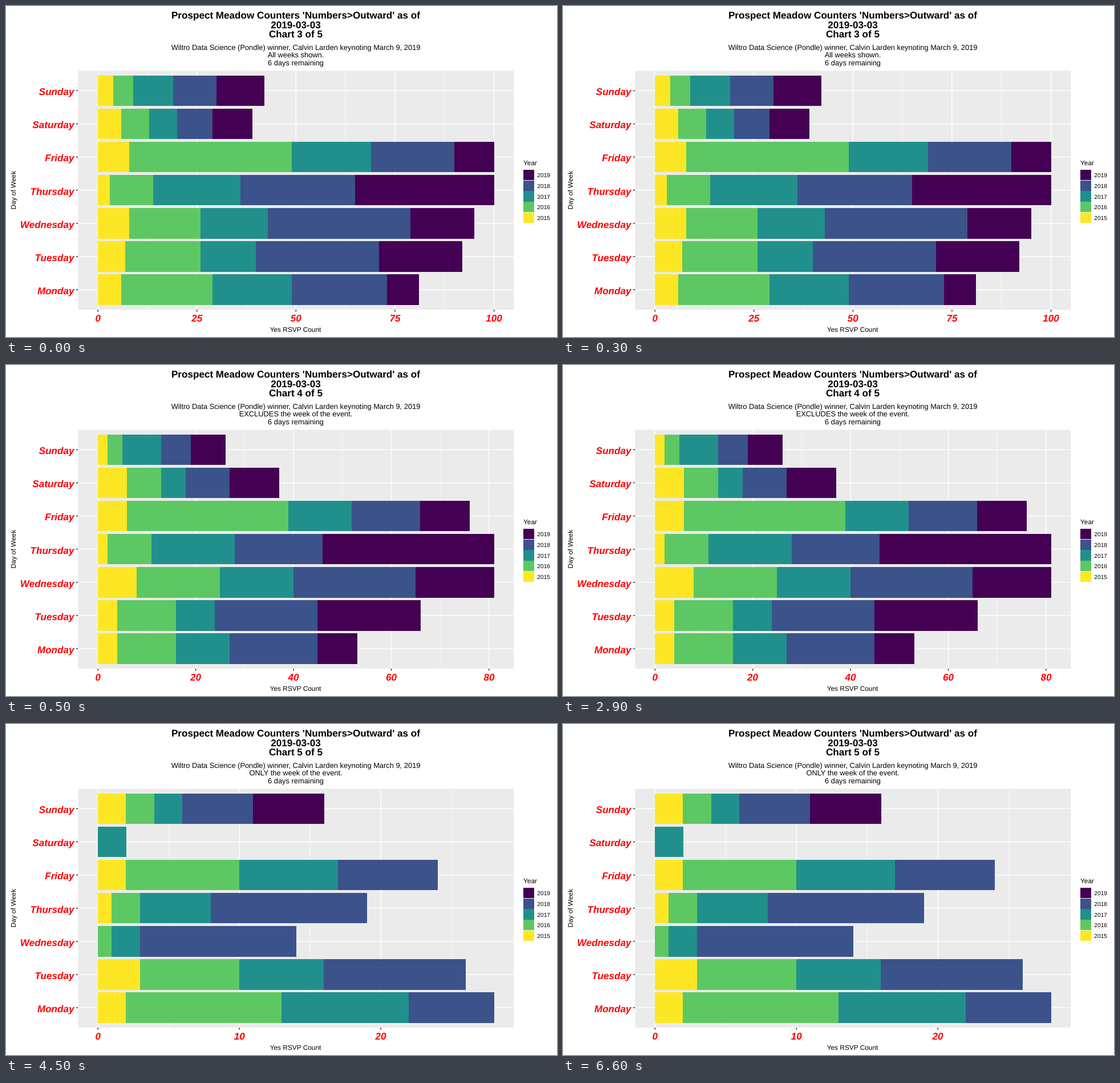
Write an HTML page that moves like this. It is 966 px wide and 580 px high and loops after 8000 ms.

```html
<!DOCTYPE html>
<html lang="en">
<head>
<meta charset="utf-8">
<title>RSVP counts by day of week</title>
<style>
  html, body { margin: 0; width: 100%; height: 100%; overflow: hidden; background: #fff; }
  svg { display: block; font-family: "Liberation Sans", Arial, sans-serif; text-rendering: geometricPrecision; }
  .title { font-size: 17.1px; font-weight: bold; text-anchor: middle; }
  .subtitle { font-size: 12.87px; text-anchor: middle; }
  .tick { font-size: 17.1px; font-weight: bold; font-style: italic; fill: #f00; text-anchor: middle; }
  .day { text-anchor: end; }
  .axis { font-size: 11.85px; text-anchor: middle; }
  .legend { font-size: 11.85px; }
  .key { font-size: 10.2px; }
</style>
</head>
<body>
<svg id="stage" width="966" height="580" viewBox="0 0 966 580"></svg>
<script>
const LOOP = 8000;
const PANEL = { left: 126.5, top: 113.5, right: 890.2, bottom: 532 };
const ZERO_X = 161.2, SPAN = 694.3;
const ROW = (PANEL.bottom - PANEL.top) / 7.2;
const CENTER_X = 508;
const COLORS = ['#fde725', '#5dc863', '#21908c', '#3b528b', '#440154'];

// Yearly counts from 2015 on, before and during the week of the event.
const DAYS = [
  { name: 'Sunday', before: [2, 3, 8, 6, 7], during: [2, 2, 2, 5, 5] },
  { name: 'Saturday', before: [6, 7, 5, 9, 10], during: [0, 0, 2] },
  { name: 'Friday', before: [6, 33, 13, 14, 10], during: [2, 8, 7, 7] },
  { name: 'Thursday', before: [2, 9, 17, 18, 35], during: [1, 2, 5, 11] },
  { name: 'Wednesday', before: [8, 17, 15, 25, 16], during: [0, 1, 2, 11] },
  { name: 'Tuesday', before: [4, 12, 8, 21, 21], during: [3, 7, 6, 10] },
  { name: 'Monday', before: [4, 12, 11, 18, 8], during: [2, 11, 9, 6] },
];

const CHARTS = [
  { start: 0, note: 'All weeks shown.', step: 25,
    counts: day => day.before.map((count, year) => count + (day.during[year] || 0)) },
  { start: 500, note: 'EXCLUDES the week of the event.', step: 20, counts: day => day.before },
  { start: 4500, note: 'ONLY the week of the event.', step: 10, counts: day => day.during },
];

const stage = document.getElementById('stage');

function add(parent, tag, attributes = {}, content = '') {
  const node = document.createElementNS('http://www.w3.org/2000/svg', tag);
  for (const name in attributes) node.setAttribute(name, attributes[name]);
  node.textContent = content;
  return parent.appendChild(node);
}

const text = (parent, style, x, y, content, extra = {}) =>
  add(parent, 'text', { class: style, x, y, ...extra }, content);

const line = (parent, x1, y1, x2, y2, stroke, width = 1.4) =>
  add(parent, 'line', { x1, y1, x2, y2, stroke, 'stroke-width': width });

const rect = (parent, left, top, right, bottom, fill) =>
  add(parent, 'rect', { x: left, y: top, width: right - left, height: bottom - top, fill });

// Fills every pixel that the box touches.
const solidRect = (parent, left, top, right, bottom, fill) =>
  rect(parent, Math.floor(left), Math.floor(top), Math.ceil(right), Math.ceil(bottom), fill);

const rowY = row => PANEL.top + (row + 0.6) * ROW;
const sum = numbers => numbers.reduce((a, b) => a + b, 0);

function drawFixedParts() {
  text(stage, 'title', CENTER_X, 22, "Prospect Meadow Counters 'Numbers>Outward' as of");
  text(stage, 'title', CENTER_X, 38.6, '2019-03-03');
  text(stage, 'subtitle', CENTER_X, 76.6,
    'Wiltro Data Science (Pondle) winner, Calvin Larden keynoting March 9, 2019');
  text(stage, 'subtitle', CENTER_X, 104.3, '6 days remaining');
  rect(stage, PANEL.left, PANEL.top, PANEL.right, PANEL.bottom, '#ebebeb');
  DAYS.forEach((day, row) => {
    const y = rowY(row);
    line(stage, PANEL.left - 3.7, y, PANEL.left, y, '#333');
    line(stage, PANEL.left, y, PANEL.right, y, '#fff');
    text(stage, 'tick day', 119.5, y + 7.8, day.name);
  });
  text(stage, 'axis', CENTER_X - 0.5, 571, 'Yes RSVP Count');
  text(stage, 'axis', 0, 0, 'Day of Week', { transform: 'translate(17 322.7) rotate(-90)' });

  text(stage, 'legend', 907, 279, 'Year');
  rect(stage, 907, 287, 926, 380, '#f2f2f2');
  COLORS.forEach((color, year) => {
    const y = 287 + (4 - year) * 18.6;
    solidRect(stage, 907.9, y + 0.7, 925.3, y + 17.9, color);
    text(stage, 'legend key', 931.3, y + 13.4, 2015 + year);
  });
}

function drawChart({ note, step, counts }, index) {
  const group = add(stage, 'g');
  const rows = DAYS.map(counts);
  const max = Math.max(...rows.map(sum));
  const valueX = value => ZERO_X + value / max * SPAN;
  text(group, 'title', CENTER_X, 55.2, `Chart ${index + 3} of 5`);
  text(group, 'subtitle', CENTER_X, 90.4, note);

  for (let value = 0; value <= max; value += step) {
    const x = valueX(value), middle = valueX(value + step / 2);
    line(group, x, PANEL.top, x, PANEL.bottom, '#fff');
    line(group, x, PANEL.bottom, x, PANEL.bottom + 3.7, '#333');
    text(group, 'tick', x, 553.4, value);
    if (middle < PANEL.right) line(group, middle, PANEL.top, middle, PANEL.bottom, '#fff', 0.7);
  }

  rows.forEach((row, i) => {
    const top = rowY(i) - 0.45 * ROW, bottom = rowY(i) + 0.45 * ROW;
    let total = 0;
    row.forEach((count, year) => {
      const left = valueX(total);
      total += count;
      if (count) solidRect(group, left, top, valueX(total), bottom, COLORS[year]);
    });
  });
  return group;
}

drawFixedParts();
const groups = CHARTS.map(drawChart);

function render() {
  const time = performance.now() % LOOP;
  const current = CHARTS.findLastIndex(chart => time >= chart.start);
  groups.forEach((group, i) => group.setAttribute('display', i === current ? 'inline' : 'none'));
  requestAnimationFrame(render);
}
render();
</script>
</body>
</html>
```
